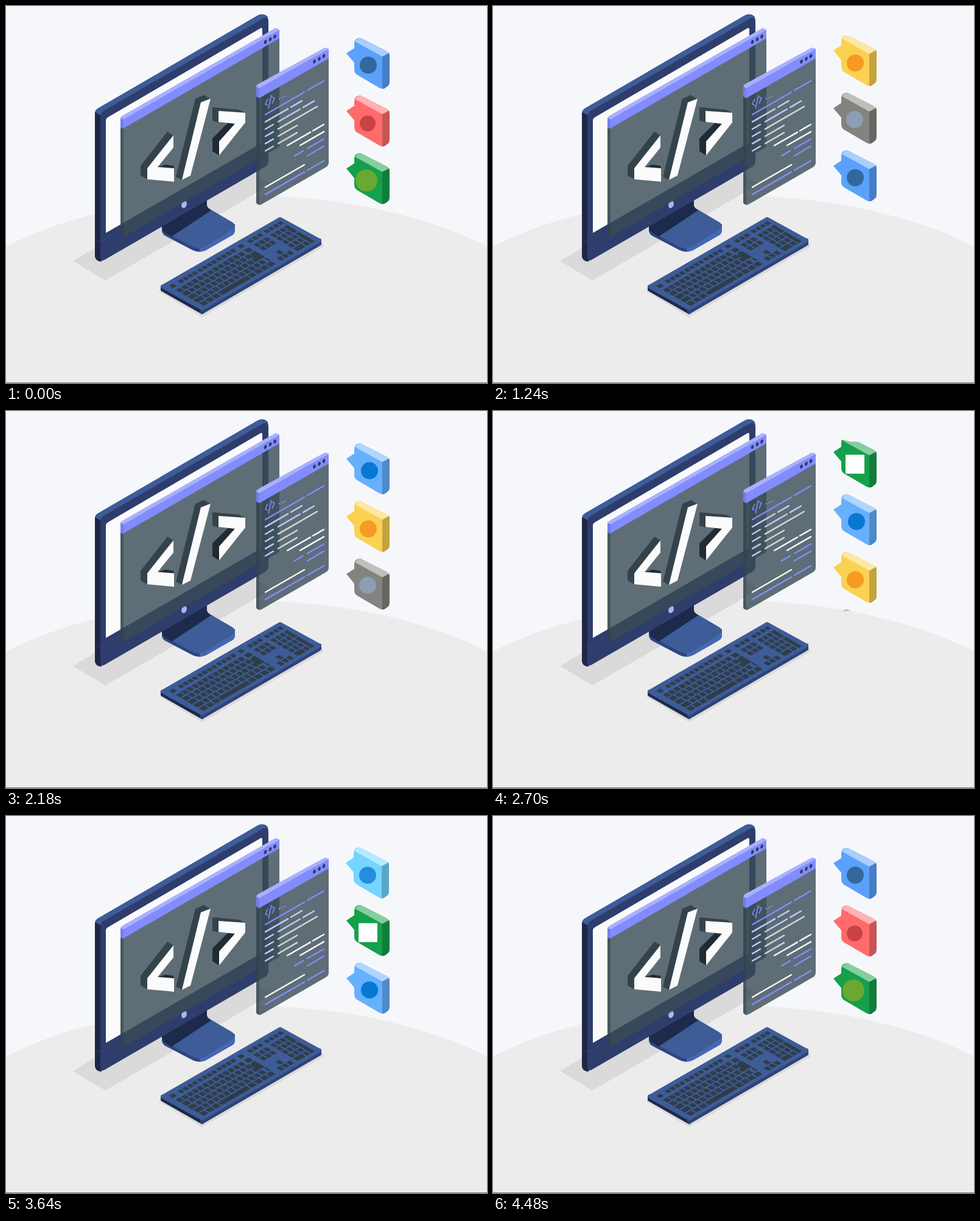
An HTML page for the animation above (4510 ms loop, 790 by 618 pixels).

```html
<!DOCTYPE html>
<html lang="en">
<head>
<meta charset="utf-8">
<title>Development tools</title>
<style>
  html, body { margin: 0; width: 100%; height: 100%; overflow: hidden; background: #f6f7fb; }
  svg { display: block; }
</style>
</head>
<body>
<svg id="stage" width="790" height="618" viewBox="0 0 790 618">
  <defs>
    <clipPath id="window">
      <path d="M550 47H575L585 50L603 51L634 68V327.500H550Z"/>
    </clipPath>
  </defs>

  <ellipse cx="395" cy="596" rx="560" ry="285" fill="#ececec"/>
  <path d="M0 617.500H790" stroke="#777"/>
  <path d="M110 418L163 450L437 292L380 258Z" fill="#dadada"/>

  <!-- stand -->
  <path d="M256 362V369Q257 374 262 377L306 400Q318 406 329 400L371 376Q376 373 376 368V358L330 332Z" fill="#2e4583"/>
  <path d="M318 403Q325 402 329 400L371 376Q376 373 376 366V362L318 396Z" fill="#4668b4"/>
  <path d="M262 371L330 330L371 354Q380 360 371 367L328 394Q318 400 307 395Z" fill="#3d5c98"/>
  <path d="M256 361L330 317V327Q331 331 337 335L272 378L262 372Q256 368 256 361Z" fill="#1e2a4b"/>

  <!-- monitor -->
  <path d="M146 176Q146 170 152 167L414 15Q424 11 430 18L431 27L155 190Z" fill="#3d5c98"/>
  <path d="M146 174V411Q148 419 157 419V180Z" fill="#1e2747"/>
  <path d="M155 183Q155 175 160 172L423 20Q431 17 431 26V253Q431 261 425 264L162 416Q155 420 155 412Z" fill="#2e3d6c"/>
  <path d="M146 383L155 387L188 368" fill="none" stroke="#3b4a7a" stroke-width=".7"/>
  <path d="M164 188Q164 184 168 182L417 37Q421 34 421 39V224L164 372Z" fill="#fafafb"/>
  <ellipse cx="292.500" cy="325.500" rx="4.200" ry="6" transform="rotate(20 292.500 325.500)" fill="#a5b8f2"/>

  <!-- large window -->
  <path d="M188 184L449 39V231L196 377Q192 379 188 375Z" fill="#394b55" fill-opacity=".8"/>
  <path d="M188 198L193 201V378L188 375Z" fill="#2b3b45" fill-opacity=".45"/>
  <path d="M188 183L193 186L449 39V53L192 201L188 199Z" fill="#828cff"/>
  <path d="M188 184Q188 182 191 180L441 37Q444 35 449 39L193 186Z" fill="#a9b0ff"/>
  <path d="M188 184L193 186V201L188 199Z" fill="#737df0"/>

  <!-- code symbol -->
  <g fill="#34434b">
    <path d="M265 206L275 212L232 268V284L221 278V262Z"/>
    <path d="M311 152L325 146L335 152L320 158L289 285L279 280Z"/>
    <path d="M339 166L383 170L393 175L349 173V191L339 188Z"/>
    <path d="M339 217L365 191L376 193L350 222V245L339 238Z" fill="#202b34"/>
    <path d="M249 264L262 260L275 262L276 267Z" fill="#202b34"/>
  </g>
  <g fill="#fbfbfc">
    <path d="M275 212V232L249 264L276 266V288L232 284V266Z"/>
    <path d="M320 158L336 152L303 278L289 285Z"/>
    <path d="M349 172L393 175V191L350 245V222L376 193L349 190Z"/>
  </g>

  <!-- small window -->
  <path d="M411 132L530 71V257Q530 261 526 264L420 325Q415 328 411 323Z" fill="#394b55" fill-opacity=".8"/>
  <path d="M411 148L416 151V326L411 323Z" fill="#2b3b45" fill-opacity=".4"/>
  <path d="M411 131L416 135L530 70V86L416 151L411 148Z" fill="#828cff"/>
  <path d="M411 132Q411 130 414 128L522 69Q525 67 530 70L416 135Z" fill="#a9b0ff"/>
  <path d="M411 132L416 135V151L411 148Z" fill="#737df0"/>
  <path d="M430 152L426 161L430 163M436 146L431 168M437 149L441 151L437 160" fill="none" stroke="#828cff" stroke-width="1.600"/>
  <path d="M449 152h.1M453.500 150h.1M458 148h.1" stroke="#828cff" stroke-width="2.600" stroke-linecap="round"/>
  <g id="dots" fill="#2c3b5b"></g>
  <g id="lines" stroke-width="2.400" stroke-linecap="round"></g>

  <!-- keyboard -->
  <path d="M250 467L322 510L522 394L518 386Z" fill="#dadada"/>
  <g stroke-width="6" stroke-linejoin="round">
    <path d="M257 460V465L322 502V496Z" fill="#1e2a4b" stroke="#1e2a4b"/>
    <path d="M322 496V502L515 390V384Z" fill="#2f4275" stroke="#2f4275"/>
    <path d="M257 460L450 349L515 384.500L322 496Z" fill="#3d5c98" stroke="#3d5c98"/>
  </g>
  <g id="keys" transform="matrix(1.96 -1.14 .68 .395 254 460)" fill="#303d48"></g>

  <g clip-path="url(#window)"><g id="column"></g></g>
</svg>
<script>
  const LOOP = 4510, STEP = LOOP / 6, MOVE = STEP * .75, PITCH = 94.5;
  const stops = [0, 94.5, 189, 284.3, 378.3, 471.7, 0];
  const $ = id => document.getElementById(id);

  // window buttons
  $('dots').innerHTML = [[426, 59], [434, 54.5], [441.5, 50], [506.5, 91], [514.5, 86.5], [522, 82]]
    .map(([x, y]) => `<ellipse cx="${x}" cy="${y}" rx="2.1" ry="3.4" transform="rotate(18 ${x} ${y})"/>`).join('');

  // code lines: each row holds [from, to, colour]
  const P = '#828cff', L = '#c5cbff', W = '#fafafa', G = '#d5d8d6';
  const rows = [
    [[426, 490, P], [495, 522, P]],
    [[426, 463, L], [468, 486, L]],
    [[426, 439, L], [447, 483, L], [488, 506, L]],
    [[426, 439, L], [447, 511, G]],
    [[426, 439, L], [447, 478, G]],
    [[426, 439, L], [447, 478, G]],
    [[462, 500, W], [504, 522, W]],
    [[483, 522, W]],
    [[474, 488, P], [495, 522, P]],
    [[495, 522, P]],
    [[426, 490, W]],
    [[426, 490, P], [495, 522, P]]
  ];
  const lineY = (x, row) => 178 + row * 11.9 - (x - 426) * .575;
  $('lines').innerHTML = rows.map((row, i) => row.map(([a, b, c]) =>
    `<path d="M${a} ${lineY(a, i)}L${b} ${lineY(b, i)}" stroke="${c}"/>`).join('')).join('');

  // keyboard
  const key = (x, y, w, h) => `<rect x="${x}" y="${y}" width="${w}" height="${h}"/>`;
  const run = (x, y, n, w, h, gap = 1) =>
    Array.from({ length: n }, (_, i) => key(x + i * (w + gap), y, w, h)).join('');
  let keys = key(4, 9, 3.4, 9);
  for (const x of [11, 27, 43]) keys += run(x, 9, 4, 2.9, 9);
  keys += run(61, 9, 1, 3.4, 9) + run(69, 9, 3, 3, 9) + run(83, 9, 4, 2.8, 9);
  for (let r = 0; r < 4; r++) {
    const y = 25 + r * 14, lead = 3.3 + r * .9;
    keys += key(4, y, lead, 11) + run(5 + lead, y, 12, 3.3, 11);
    keys += key(57.6 + lead, y, 7.4 - lead, 11);
    if (r < 2) keys += run(69, y, 3, 3, 11);
    keys += run(83, y, 3, 2.8, 11);
  }
  keys += key(60, 42, 5, 21);
  keys += run(4, 81, 3, 4.2, 11) + key(19.6, 81, 24, 11) + run(44.6, 81, 4, 4.2, 11);
  keys += key(73, 67, 3, 11) + run(69, 81, 3, 3, 11);
  keys += key(83, 81, 6.6, 11) + key(90.6, 81, 2.8, 11) + key(94.4, 25, 2.8, 25) + key(94.4, 53, 2.8, 39);
  $('keys').innerHTML = keys;

  // speech tiles, bottom to top: body, badge colour, badge centre and radius (0 = square)
  const tiles = [
    ['#15a04b', '#6aa832', 592, 97, 18],
    ['#ff6b6b', '#c94343', 594, 98, 13],
    ['#5ba1fb', '#33689d', 595, 97, 14],
    ['#83837f', '#8d9db3', 594, 96, 14],
    ['#fad151', '#f59a23', 595, 98, 14],
    ['#66b0fe', '#0878d3', 597, 97, 14],
    ['#15a04b', '#ffffff', 594, 97, 0],
    ['#74d5fe', '#238de0', 595, 98, 14]
  ];
  const tile = ([body, badge, x, y, r], i) => `
    <g transform="translate(${i === 7 ? -1 : 0} ${(2 - i) * PITCH})">
      <path fill="${body}" d="M572 62Q572 52 583 52L626 74Q630 77 630 82V124Q630 130 626 132L622 135Q618 137 613 134L577 113Q572 110 572 104V93L559 77.500L572 69Z"/>
      <path fill="#fff" fill-opacity=".48" d="M573 58Q578 52 583 52Q586 51 589 53L626 73L630 77L618 83Z"/>
      <path fill="#000" fill-opacity=".22" d="M618 83L630 76V124Q630 130 626 132L622 135L618 136Z"/>
      ${r ? `<circle cx="${x}" cy="${y}" r="${r}" fill="${badge}"/>`
          : `<rect x="${x - 15}" y="${y - 15}" width="31" height="31" fill="${badge}"/>`}
    </g>`;
  $('column').innerHTML = tiles.map(tile).join('');

  const start = performance.now();
  function draw(now) {
    const t = Math.max(0, now - start) % LOOP, n = Math.floor(t / STEP);
    const p = Math.min(1, (t - n * STEP) / MOVE), ease = p * p * (3 - 2 * p);
    const y = stops[n] + (stops[n + 1] - stops[n]) * ease;
    $('column').setAttribute('transform', `translate(0 ${y})`);
    requestAnimationFrame(draw);
  }
  draw(start);
</script>
</body>
</html>
```
